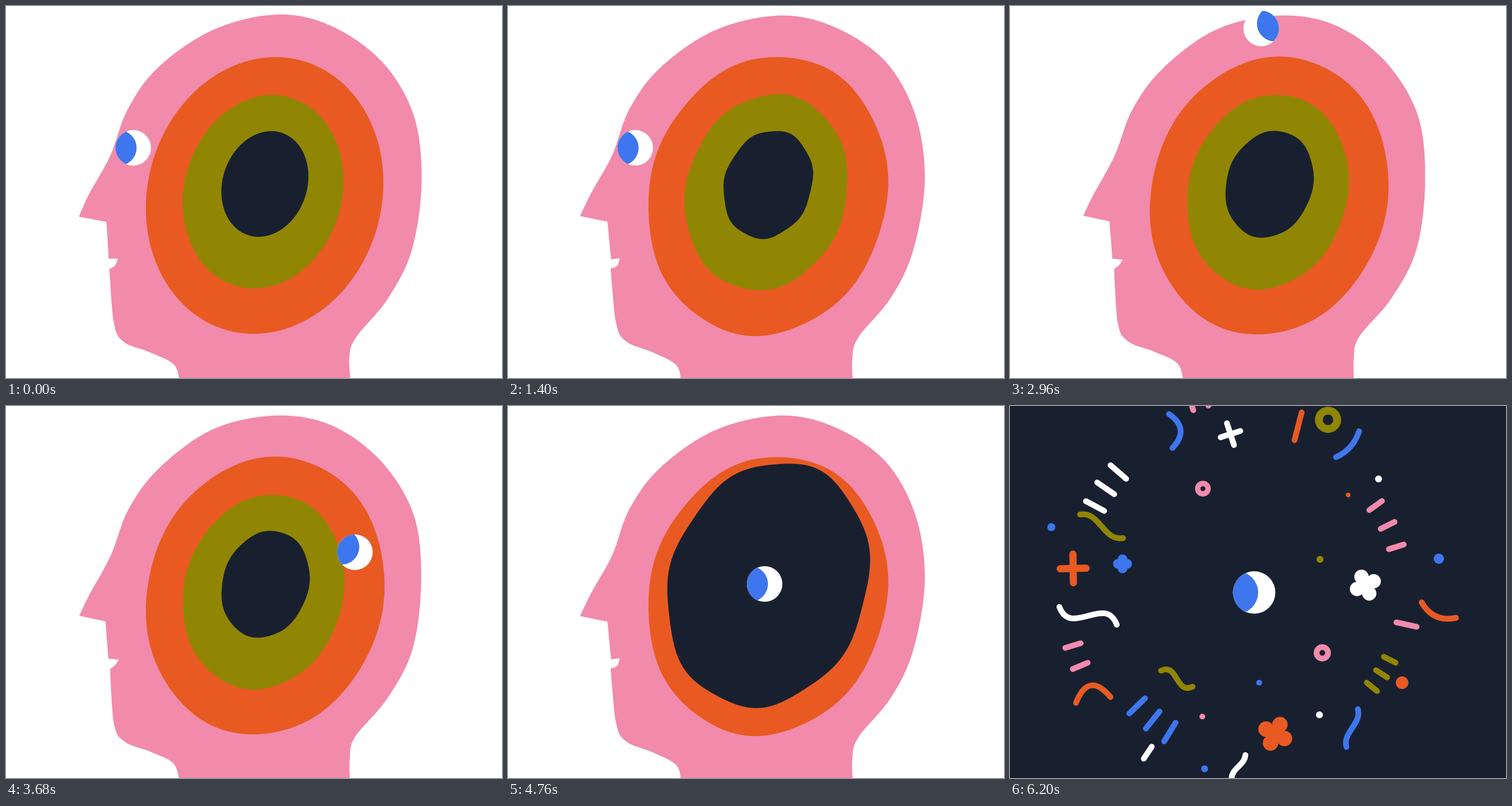
An HTML page with a canvas that plays this animation: 864 by 648 pixels, repeating every 6240 ms.

```html
<!DOCTYPE html>
<html lang="en">
<head>
<meta charset="utf-8">
<title>Rolling eye</title>
<style>
  html, body { margin: 0; width: 100%; height: 100%; overflow: hidden; background: #fff; }
  canvas { display: block; width: 100vw; height: 100vh; }
</style>
</head>
<body>
<canvas id="stage" width="864" height="648"></canvas>
<script>
const LOOP = 6240, STEP = 40, TAU = Math.PI * 2, RAD = Math.PI / 180;
const MID = { x: 428, y: 323 };
const pink = '#f28aab', orange = '#e85a22', olive = '#908604';
const navy = '#182030', blue = '#3e76ee', white = '#ffffff';
const ctx = document.getElementById('stage').getContext('2d');

const clamp = v => Math.max(0, Math.min(1, v));
const lerp = (a, b, k) => a + (b - a) * k;
const span = (t, a, b) => clamp((t - a) / (b - a));
const easeOut = k => 1 - (1 - k) * (1 - k);
const noise = n => { const v = Math.sin(n * 127.1) * 43758.5; return v - Math.floor(v) - 0.5; };

// Head: key points, where each bar is a sharp corner.
const PROFILE = `303 660 293 625 250 603 205 585 188 552 180 458 | 190 452 195 440 | 179 440
  | 175 376 | 127 367 | 145 327 182 260 212 180 265 107 360 42 470 15 565 34 655 97 710 190
  724 305 707 425 665 510 610 577 598 612 601 660`;

function headPath(pose) {
  const path = new Path2D();
  let seed = pose * 50, last = null;
  for (const part of PROFILE.split('|')) {
    const n = part.trim().split(/\s+/).map(v => +v + (pose ? 4 * noise(++seed) : 0));
    const pts = last ? [last] : [];
    for (let i = 0; i < n.length; i += 2) pts.push([n[i], n[i + 1]]);
    if (!last) path.moveTo(...pts[0]);
    const at = i => pts[Math.max(0, Math.min(pts.length - 1, i))];
    for (let i = 0; i < pts.length - 1; i++) {
      const [a, b, c, d] = [at(i - 1), at(i), at(i + 1), at(i + 2)];
      path.bezierCurveTo(
        b[0] + (c[0] - a[0]) / 6, b[1] + (c[1] - a[1]) / 6,
        c[0] - (d[0] - b[0]) / 6, c[1] - (d[1] - b[1]) / 6, ...c);
    }
    last = pts[pts.length - 1];
  }
  return path;
}
const HEADS = [0, 1, 2].map(headPath);

// A leaning ellipse that swells a little with each pose.
function ring(color, pose, cx, cy, rx, ry, lean, size = 1) {
  ctx.beginPath();
  for (let a = 0; a < TAU; a += 0.05) {
    const wobble = pose * 0.6 * Math.sin(7 * a + pose * 2 + rx);
    const x = (rx + pose + wobble) * Math.cos(a) - lean * Math.sin(a);
    const y = (ry + pose + wobble) * Math.sin(a);
    ctx.lineTo(cx + pose + x * size, cy + pose / 2 + y * size);
  }
  ctx.fillStyle = color;
  ctx.fill();
}

// Confetti: every piece is a round-capped stroke.
const piece = (ink, width, draw, dash = []) => {
  const path = new Path2D();
  draw(path);
  return { ink, width, path, dash };
};
const line = (p, x, y, dx, dy) => { p.moveTo(x - dx, y - dy); p.lineTo(x + dx, y + dy); };
const spot = (p, x, y) => line(p, x, y, 0.01, 0);

const dot = (ink, x, y, r) => piece(ink, 2 * r, p => spot(p, x, y));
function hoop(ink, x, y, r, gaps) {
  const part = gaps ? TAU * r / gaps : 0;
  return piece(ink, gaps ? 8 : r * 0.6 + 4, p => p.arc(x, y, r, 0, TAU),
    gaps ? [part * 0.3, part * 0.7] : []);
}
// Equal bends make an arc, opposite bends a wave.
function stroke(ink, x, y, x2, y2, bend, bend2 = bend) {
  const dx = x2 - x, dy = y2 - y, len = Math.hypot(dx, dy), nx = -dy / len, ny = dx / len;
  return piece(ink, 10, p => {
    p.moveTo(x, y);
    p.bezierCurveTo(x + dx / 3 + nx * bend, y + dy / 3 + ny * bend,
      x + dx * 2 / 3 + nx * bend2, y + dy * 2 / 3 + ny * bend2, x2, y2);
  });
}
const wave = (ink, x, y, x2, y2, bend) => stroke(ink, x, y, x2, y2, bend, -bend);
// Dashes that point at the middle.
const fan = (ink, count, angle, turn, dist, len) => piece(ink, 10, p => {
  for (let i = 0; i < count; i++) {
    const a = (angle + i * turn) * RAD, c = Math.cos(a), s = Math.sin(a);
    line(p, MID.x + dist * c, MID.y + dist * s, c * len / 2, s * len / 2);
  }
});
const flower = (ink, x, y, size, angle) => piece(ink, size + 9, p => {
  spot(p, x, y);
  for (let i = 0; i < 4; i++) {
    const a = angle * RAD + i * TAU / 4;
    spot(p, x + size * Math.cos(a), y + size * Math.sin(a));
  }
});
const cross = (ink, x, y, arm, angle) => piece(ink, arm / 2, p => {
  const dx = arm * Math.cos(angle * RAD), dy = arm * Math.sin(angle * RAD);
  line(p, x, y, dx, dy);
  line(p, x, y, dy * 0.9, -dx * 0.9);
});

const INNER = [
  stroke(pink, 359, 143, 373, 167, -4), stroke(olive, 317, 168, 376, 218, 17),
  stroke(orange, 446, 136, 453, 224, 26), stroke(white, 524, 210, 571, 217, -14),
  stroke(olive, 530, 253, 528, 289, -39), stroke(blue, 566, 339, 601, 360, -7),
  stroke(pink, 534, 389, 556, 440, -26), stroke(orange, 481, 433, 531, 466, -11),
  wave(blue, 307, 235, 349, 263, -6), stroke(pink, 282, 304, 354, 322, -11),
  stroke(white, 281, 393, 360, 380, -13), stroke(olive, 357, 436, 384, 421, -7),
  hoop(olive, 385, 436, 11), hoop(blue, 473, 177, 13, 3), hoop(blue, 438, 467, 12, 3),
  hoop(white, 609, 313, 9, 2), hoop(orange, 522, 160, 8), hoop(orange, 326, 431, 8),
  hoop(white, 390, 499, 9), hoop(white, 279, 244, 10)
];

const OUTER = [
  fan(blue, 3, 136, -7.3, 287, 38), fan(white, 3, 221, -6.5, 317, 36),
  fan(pink, 3, -35.6, 9, 257, 27), fan(olive, 3, 27, 6.2, 262, 23),
  fan(pink, 2, 157, 6.5, 332, 28), fan(pink, 2, 251, 4.7, 337, 6),
  fan(pink, 1, 12.4, 0, 269, 36), fan(white, 1, 123.8, 0, 338, 25), fan(orange, 1, -75.6, 0, 297, 50),
  stroke(blue, 277, 14, 283, 73, -23), stroke(blue, 608, 44, 568, 89, -9),
  stroke(orange, 717, 342, 777, 369, 16), stroke(orange, 115, 517, 175, 507, -34),
  wave(blue, 606, 528, 586, 594, -14), wave(white, 410, 608, 386, 648, -8),
  wave(white, 86, 350, 186, 381, 45), wave(olive, 122, 189, 197, 230, -22),
  wave(olive, 263, 461, 318, 489, -26),
  flower(white, 619, 312, 16, 65), flower(orange, 462, 571, 18, 27), flower(blue, 196, 275, 8, 0),
  cross(white, 384, 49, 20, 72), cross(orange, 110, 283, 25, 89),
  hoop(olive, 554, 24, 16), hoop(pink, 336, 144, 9), hoop(pink, 544, 430, 10),
  dot(white, 642, 127, 6), dot(orange, 589, 155, 4), dot(blue, 747, 266, 9), dot(olive, 540, 267, 6),
  dot(orange, 683, 482, 11), dot(white, 539, 538, 6), dot(blue, 434, 482, 5), dot(pink, 335, 541, 5),
  dot(blue, 339, 632, 6), dot(blue, 72, 211, 7)
];

function drawBurst(list, spread, weight) {
  if (weight <= 0) return;
  ctx.save();
  ctx.translate(MID.x, MID.y);
  ctx.scale(spread, spread);
  ctx.translate(-MID.x, -MID.y);
  ctx.lineCap = 'round';
  for (const { ink, width, path, dash } of list) {
    ctx.strokeStyle = ink;
    ctx.lineWidth = width * weight / spread;
    ctx.setLineDash(dash);
    ctx.stroke(path);
  }
  ctx.restore();
}

// Eye keys: time, angle and distance from the centre, gaze angle.
const ORBIT = [
  [2000, 195.6, 234, 180], [2160, 196, 234, 124], [2960, 268, 271, -20],
  [3680, 341, 170, -158], [4480, 450, 0, -180]
];
function orbit(t) {
  const end = ORBIT.length - 1, now = Math.max(ORBIT[0][0], Math.min(ORBIT[end][0], t));
  const i = Math.max(0, ORBIT.findIndex(k => k[0] >= now) - 1);
  const a = ORBIT[i], b = ORBIT[i + 1], dt = b[0] - a[0], u = (now - a[0]) / dt;
  const slope = (j, c) => j < 1 || j === end ? 0
    : (ORBIT[j + 1][c] - ORBIT[j - 1][c]) / (ORBIT[j + 1][0] - ORBIT[j - 1][0]);
  return a.map((v, c) => {
    const m = slope(i, c) * dt, n = slope(i + 1, c) * dt, d = b[c] - v;
    return v + u * (m + u * (3 * d - 2 * m - n + u * (m + n - 2 * d)));
  });
}

function drawEye(t) {
  const [, angle, dist, gaze] = orbit(t);
  const drift = easeOut(span(t, 4760, 6400)), r = 31 + 6 * drift;
  ctx.save();
  ctx.translate(447 + dist * Math.cos(angle * RAD) - 22 * drift,
    310 + dist * Math.sin(angle * RAD) + 15 * drift);
  ctx.rotate(gaze * RAD);
  ctx.beginPath();
  ctx.arc(0, 0, r, 0, TAU);
  ctx.fillStyle = white;
  ctx.fill();
  ctx.clip();
  ctx.beginPath();
  ctx.arc(r * 0.81, 0, r, 0, TAU);
  ctx.fillStyle = blue;
  ctx.fill();
  ctx.restore();
}

function drawHead(t, pose) {
  const dt = Math.max(0, t - 4500), size = 1 + 0.0045 * dt + 1.37e-6 * dt * dt;
  ctx.fillStyle = pink;
  ctx.fill(HEADS[pose]);
  ring(orange, pose, 450.5, 330, 206, 241, 19);
  ring(olive, pose, 448, 323.5, 139, 168.5, 16);
  ring(navy, pose, 451, 310, 75, 92, 11, size);
}

function frame(now) {
  const step = Math.floor((now % LOOP) / STEP), t = step * STEP;
  const inside = t >= 5480;
  ctx.fillStyle = inside ? navy : white;
  ctx.fillRect(0, 0, 864, 648);
  if (!inside) drawHead(t, Math.floor(step / 2) % 3);

  const burst = easeOut(span(t, 5240, 5520)), leave = span(t, 5560, 5840);
  drawBurst(INNER, lerp(0.3, 1, burst) + 0.6 * leave, span(t, 5240, 5440) * (1 - leave));
  drawBurst(OUTER, lerp(0.35, 1, easeOut(span(t, 5640, 6200))), span(t, 5640, 5920));
  drawEye(t);
}

let start = null;
function tick(now) {
  if (start === null) start = now;
  frame(now - start);
  requestAnimationFrame(tick);
}
frame(0);
requestAnimationFrame(tick);
</script>
</body>
</html>
```
